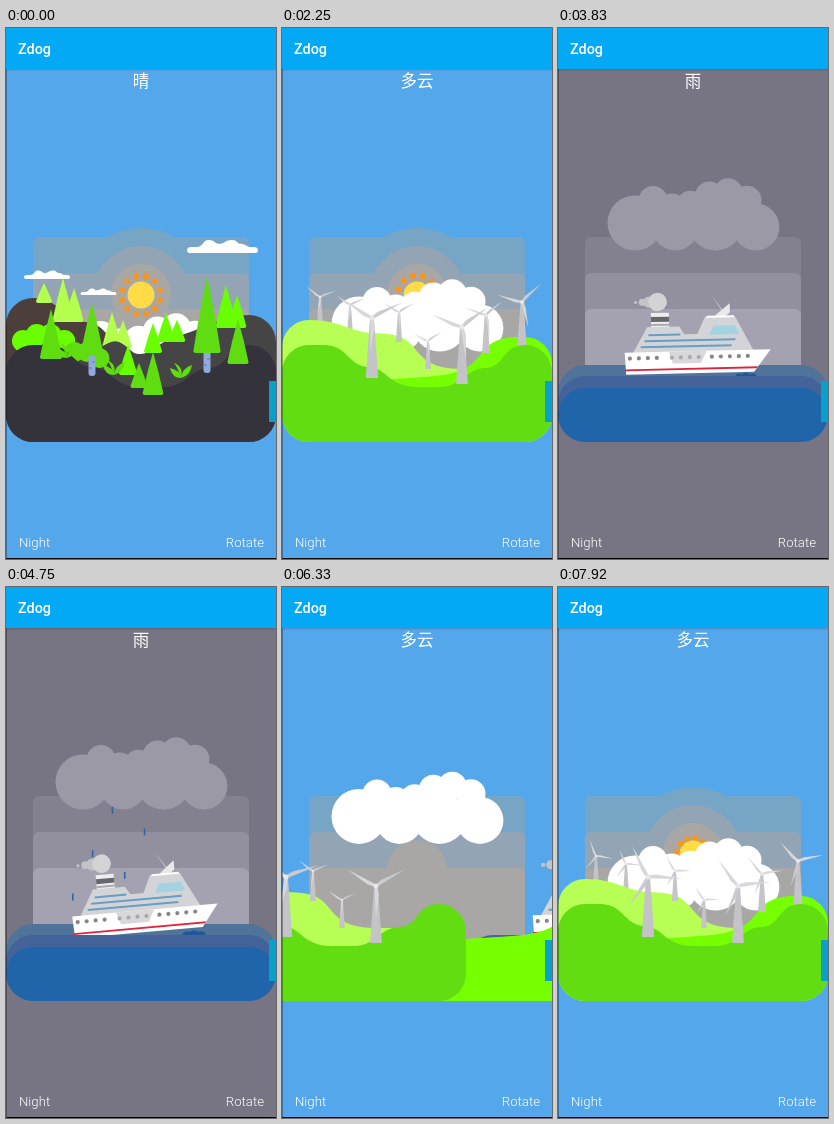
Write an HTML page with a canvas that moves like this. It is 270 px wide and 531 px high and loops after 8000 ms.

```html
<!DOCTYPE html>
<html lang="en">
<head>
<meta charset="utf-8">
<title>Zdog</title>
<style>
html, body { margin: 0; width: 100%; height: 100%; overflow: hidden; }
body { position: relative; color: #fff; font-family: Roboto, sans-serif; background: #55a7ec; }
canvas { position: absolute; inset: 0; width: 270px; height: 531px; }
header { position: absolute; left: 0; top: 0; width: 270px; height: 41px; background: #03a9f4; box-shadow: 0 1px 2px #0003; }
header b { position: absolute; left: 12px; top: 12.5px; font: 500 14.4px/17px Roboto, sans-serif; }
#weather { position: absolute; left: 0; top: 41.5px; width: 270px; text-align: center; font: 400 16.5px/21px "Noto Sans CJK SC", "Noto Sans CJK", sans-serif; }
.button { position: absolute; top: 506px; font: 300 13.2px/17px Roboto, sans-serif; }
#tab { position: absolute; left: 263px; top: 353px; width: 7px; height: 41px; background: #08a0cc; }
#edge { position: absolute; left: 0; top: 41px; width: 269px; height: 489px; border: solid #0005; border-width: 0 0 1px 1px; border-bottom-color: #000; }
</style>
</head>
<body>
<canvas></canvas>
<header><b>Zdog</b></header>
<div id="weather" lang="zh-CN">晴</div>
<div class="button" style="left:13px">Night</div>
<div class="button" style="right:calc(100% - 258px)">Rotate</div>
<div id="tab"></div>
<div id="edge"></div>
<script>
const LOOP = 8000, W = 270, TAU = Math.PI * 2, DEG = TAU / 360;
const canvas = document.querySelector('canvas');
const label = document.querySelector('#weather');
const c = canvas.getContext('2d');
const ratio = Math.max(1, window.devicePixelRatio || 1);
canvas.width = W * ratio;
canvas.height = 531 * ratio;

const DAY = { sky: '#55a7ec', layers: ['#76a5c5', '#93a5b4', '#a8a7a6'], cloud: '#ffffff' };
const GREY = { sky: '#777584', layers: ['#83818f', '#92909e', '#a4a2b0'], cloud: '#9b99a6' };
const LOOK = {
  sunny: { text: '晴', cloudY: 135, sunY: 266, tone: DAY },
  cloudy: { text: '多云', cloudY: 101, sunY: 266, tone: DAY },
  rain: { text: '雨', cloudY: 0, sunY: 320, tone: GREY }
};
const STEPS = [
  { start: -5000, from: 'sunny', to: 'sunny' },
  { start: 420, from: 'sunny', to: 'cloudy' },
  { start: 2279, from: 'cloudy', to: 'rain' },
  { start: 5820, from: 'rain', to: 'cloudy' }
];

const clamp = v => Math.min(1, Math.max(0, v));
const mix = (a, b, p) => a + (b - a) * p;
const blend = (a, b, p) => `color-mix(in srgb, ${a}, ${b} ${p * 100}%)`;
const times = (n, f) => { for (let i = 0; i < n; i++) f(i); };

function shape(color, d) {
  c.fillStyle = color;
  c.fill(new Path2D(d));
}
function disc(color, x, y, r) {
  c.fillStyle = color;
  c.beginPath();
  c.arc(x, y, Math.max(0, r), 0, TAU);
  c.fill();
}
function box(color, x, y, w, h, r = 0) {
  c.fillStyle = color;
  c.beginPath();
  c.roundRect(x, y, w, h, r);
  c.fill();
}
function at(x, y, draw, angle = 0, scale = 1) {
  c.save();
  c.translate(x, y);
  c.rotate(angle);
  c.scale(scale, scale);
  draw();
  c.restore();
}

// Hills share one rounded base; only the ridge differs.
const hill = (color, ridge) => shape(color,
  ridge + 'V387 A27 27 0 0 1 243 414 H27 A27 27 0 0 1 0 387 Z');
const frontHill = color => hill(color,
  'M0 344 A27 27 0 0 1 27 317 H42 C66 317 66 338 86 339 C106 340 106 359 136 359 H158 C180 359 184 340 204 340 C224 338 220 317 243 317 A27 27 0 0 1 270 344 ');
const wave = (color, y) => box(color, 0, y, W, 54, 27);

function tree(color, x, base, height) {
  const h = 6 + height * .1, m = base - height * .55;
  shape(color, `M${x} ${base - height} Q${x + h * .55} ${m} ${x + h} ${base - 2} Q${x + h} ${base} ${x + h - 3} ${base} H${x - h + 3} Q${x - h} ${base} ${x - h} ${base - 2} Q${x - h * .55} ${m} ${x} ${base - height}`);
}
function pair(color, x, base, height) {
  tree(color, x, base, height);
  tree(color, x + 11, base, height * .77);
}
function trunkTree(color, x, base, height) {
  box('#92a9dc', x - 3.5, base - 3, 7, 23, 3);
  box('#7890cc', x, base + 5, 3, 2);
  box('#7890cc', x - 3, base + 11, 3, 2);
  tree(color, x, base, height);
}
function bush(color, x, y, r) {
  times(4, i => disc(color, x + r * 1.25 * i, y - 7 * Math.sin(i * 1.05), r));
}
function grass(color, x, y) {
  at(x, y, () => shape(color,
    'M0 10 Q-1 2 -11 0 Q-9 10 0 10 M0 10 Q-3 0 -7 -5 Q3 -1 0 10 M0 10 Q1 0 11 -3 Q9 8 0 10'));
}
function windmill(t, x, y, height) {
  const len = height * .58, w = len / 7;
  shape('#c3c3c8', `M${x - w * .4} ${y} H${x + w * .4} L${x + w * 1.25} ${y + height} H${x - w * 1.25} Z`);
  at(x, y, () => {
    times(3, i => {
      shape(i ? '#d8d8dc' : '#cacad0', `M0 ${-w * .3} L${len * .25} ${-w * .6} L${len} 0 L0 ${w * .3} Z`);
      c.rotate(TAU / 3);
    });
    disc('#e8e8ea', 0, 0, w * .5);
  }, ((180 - x) / 9 - 30 + (t - 6330) * .09) * DEG);
}

function smoke(t) {
  const puff = clamp((t - 2900) / 1000);
  times(3, i => {
    const u = (3 - i + t / 900 % 1) / 4;
    disc('#c3c3c8', 102 - 29 * u * puff, 276, 9 * (1 - u) * puff);
  });
  disc('#d3d3d5', 102, 276, 9.3);
}
function ship(t) {
  const swing = (t - 3113) / 4000 * TAU;
  const bob = -1.5 - 1.8 * Math.cos(swing - 1.8);
  at(137, 338 + bob, () => {
    c.translate(-138, -338);
    smoke(t);
    box('#eeeeee', 95, 287, 18, 15);
    box('#66666c', 95, 291, 18, 5);
    box('#aaaaae', 95, 298, 18, 2);
    shape('#d3d3d5', 'M156 270 L167.6 287 H166.4 Z');
    shape('#e9e9eb', 'M159 291 L174 279 V288 L168 293 Z');
    shape('#d3d4d7', 'M76 327 L91 301 H123 L128 309 H141 L149 292 H179 L197 327 Z');
    shape('#fff', 'M151 291 H178 V293 H150 Z');
    shape('#a3d2e0', 'M157 301 H179 L183 310 H153 Z');
    times(3, i => box('#699dc4', 92 - 4 * i, 308 + 6 * i, i ? 91 : 32, 2));
    shape('#fff', 'M68 326 H214 L197 348 H69 Z');
    shape('#d8d8da', 'M112 326 H150 L144 338 H116 Z');
    times(13, i => {
      const deck = i > 3 && i < 8;
      disc(deck ? '#aaaaae' : '#85858d', 73 + i * 9 + (i > 3) * 6 + (i > 7) * 4, 332, 2.1);
    });
    shape('#e1243d', 'M68 342.7 H201 L199.5 344.5 H68 Z');
  }, (-2.6 + 3 * Math.cos(swing)) * DEG);
}

const LIGHT = '#b4ff4d', LIME = '#6aff00', GREEN = '#5fdd11';
const scenes = {
  sunny: [
    () => {
      hill('#4c3f3b', 'M0 297 A27 27 0 0 1 27 270 C53 270 57 292 79 294 C106 296 105 326 135 340 H270 ');
      tree(LIGHT, 38, 275, 20);
      pair(LIGHT, 57, 294, 44);
      pair(LIGHT, 106, 320, 36);
      bush(LIME, 17, 313, 11);
    },
    () => {
      hill('#454545', 'M0 360 C60 360 97 306 113 314 C125 320 125 326 134 326 C147 326 152 314 169 309 C200 300 218 287 243 287 A27 27 0 0 1 270 314 ');
      pair(LIME, 160, 314, 29);
      pair(LIME, 220, 300, 43);
      tree(LIME, 147, 325, 30);
      tree(LIME, 122, 347, 30);
    },
    () => {
      bush(GREEN, 56, 330, 10);
      frontHill('#34333c');
      grass(GREEN, 61, 320);
      grass(GREEN, 108, 337);
      grass(GREEN, 175, 340);
      tree(GREEN, 45, 331, 50);
      trunkTree(GREEN, 86, 328, 53);
      trunkTree(GREEN, 201, 325, 76);
      tree(GREEN, 232, 336, 45);
      tree(GREEN, 133, 360, 25);
      tree(GREEN, 147, 367, 43);
    }
  ],
  cloudy: [
    t => {
      windmill(t, 38, 269, 30);
      windmill(t, 68, 277, 28);
      hill('#b8ff55', 'M0 319 A27 27 0 0 1 27 292 C59 292 67 304 91 305 C117 306 124 309 134 322 C147 339 162 341 185 341 H270 ');
      windmill(t, 117, 284, 30);
      windmill(t, 146, 313, 28);
    },
    t => {
      hill('#76ff00', 'M0 386 Q0 356 30 356 C70 356 95 352 112 351 C156 348 182 349 198 327 C211 309 225 309 243 309 A27 27 0 0 1 270 336 ');
      windmill(t, 204, 287, 38);
      windmill(t, 240, 274, 45);
    },
    t => {
      frontHill('#62dd12');
      windmill(t, 90, 290, 60);
      windmill(t, 180, 299, 57);
    }
  ],
  rain: [
    () => wave('#507499', 337),
    t => {
      ship(t);
      const swell = 3 + 2 * clamp((t - 3400) / 1500);
      times(3, i => disc('#20579b', 181 + 7 * i, 349, swell + i % 2));
      wave('#43639a', 348);
    },
    () => wave('#2064aa', 360)
  ]
};

function backdrop(sunY, layers) {
  c.save();
  c.beginPath();
  c.rect(0, 41, W, 319);
  c.clip();
  layers.forEach((color, i) => {
    const top = 209 + 36 * i;
    box(color, 27, top, 216, 360 - top, [6, 6, 0, 0]);
    disc(color, 135, sunY, 66 - 18 * i);
  });
  c.restore();
}

function sun(t, to, e, ph, pc) {
  let size = 1, reach = 19.5;
  if (to === 'cloudy' && t < 2279) reach -= 8 * Math.sin(Math.PI * pc);
  if (to === 'rain') {
    size = 1 - ph;
    reach *= size;
  }
  if (t >= 5820) {
    size = clamp((e - 900) / 450);
    reach = size * (9 + 7 * clamp((e - 900) / 1200));
  }
  if (!size) return;
  times(12, i => {
    const a = (i + .5) / 12 * TAU + t / 4000;
    disc('#ff9410', 135 + reach * Math.cos(a), 267 + reach * Math.sin(a), 2.8 * size);
  });
  disc('#ffdc45', 135, 267, 13.5 * size);
}

function bigCloud(y, color) {
  at(0, y, () => {
    box(color, 90, 182, 110, 20);
    times(4, i => {
      const sway = 2 * Math.cos(Math.PI * i);
      disc(color, 77 + 40.3 * i, 197 - sway, 25.5 + sway);
    });
    times(6, i => disc(color, 95 + 18.8 * i, 172.5 + 8 * Math.sin(i * 1.25), 14.5));
  });
}

function smallCloud(x, y, width) {
  at(x, y, () => shape('#fff',
    'M-21 2 Q-23 2 -23 0 Q-23 -2 -20 -2 H-17 C-12 -2 -13 -6.5 -9 -6.5 C-5 -6.5 -5 -4 -2 -4 C1 -4 2 -6.5 6 -6.5 C10 -6.5 9 -4 12 -4 C15 -4 15 -2 18 -2 H20 Q23 -2 23 0 Q23 2 21 2 Z'),
    0, width / 46);
}

function bird(t, e) {
  const u = (e - 490) / 900;
  if (u <= 0 || u >= 1) return;
  const curve = (a, b, d) => (1 - u) ** 2 * a + 2 * u * (1 - u) * b + u * u * d;
  const flap = 2 * Math.sin((t - 1170) / 90);
  at(curve(175, 192, -60), curve(208, 294, 200), () =>
    shape('#56546a', `M0 4 L-3 -1 Q-5 ${-5 - flap} -9 ${-3 - flap} Q-8 0 -4 1 L0 5 L4 1 Q8 0 9 ${-3 - flap} Q5 ${-5 - flap} 3 -1 Z`),
    0, Math.min(1.3, u / .29));
}

// Each drop falls 130 px again and again, spread by the golden ratio.
function rain(t) {
  const age = t - 4250, period = 720;
  if (age < 0 || t > 5820) return;
  times(6, i => {
    const run = age - i * period / 6;
    if (run < 0) return;
    const n = i + 6 * Math.floor(run / period);
    box('#2f669f', 66 + 84 * (n * .618 % 1), 216 + 130 * (run % period) / period, 1.6, 7);
  });
}

function draw(t) {
  const { start, from, to } = STEPS.filter(s => s.start <= t).pop();
  const e = t - start;
  const ph = clamp(e / 750), pc = clamp(e / 1500), pk = clamp(e / 500);
  const a = LOOK[from], b = LOOK[to];

  label.textContent = b.text;
  c.setTransform(ratio, 0, 0, ratio, 0, 0);
  c.fillStyle = blend(a.tone.sky, b.tone.sky, pk);
  c.fillRect(0, 0, W, 531);
  backdrop(mix(a.sunY, b.sunY, ph), a.tone.layers.map((color, i) => blend(color, b.tone.layers[i], pk)));
  sun(t, to, e, ph, pc);
  bigCloud(mix(a.cloudY, b.cloudY, pc), blend(a.tone.cloud, b.tone.cloud, pk));
  if (from === 'sunny') {
    const drift = from === to ? 0 : 140 * pc;
    smallCloud(41 - drift, 249, 46);
    smallCloud(92.5 - drift, 265.5, 36);
    smallCloud(216.5 + drift, 222, 71);
  }

  // The middle layer slides to the right, the others to the left.
  times(3, i => {
    const side = i === 1 ? W : -W;
    if (ph < 1) at(side * ph, 0, () => scenes[from][i](t));
    at(side * (1 - ph), 0, () => scenes[to][i](t));
  });
  if (to === 'cloudy') bird(t, e);
  rain(t);
}

const begin = performance.now();
function tick() {
  draw((performance.now() - begin) % LOOP);
  requestAnimationFrame(tick);
}
tick();
</script>
</body>
</html>
```
